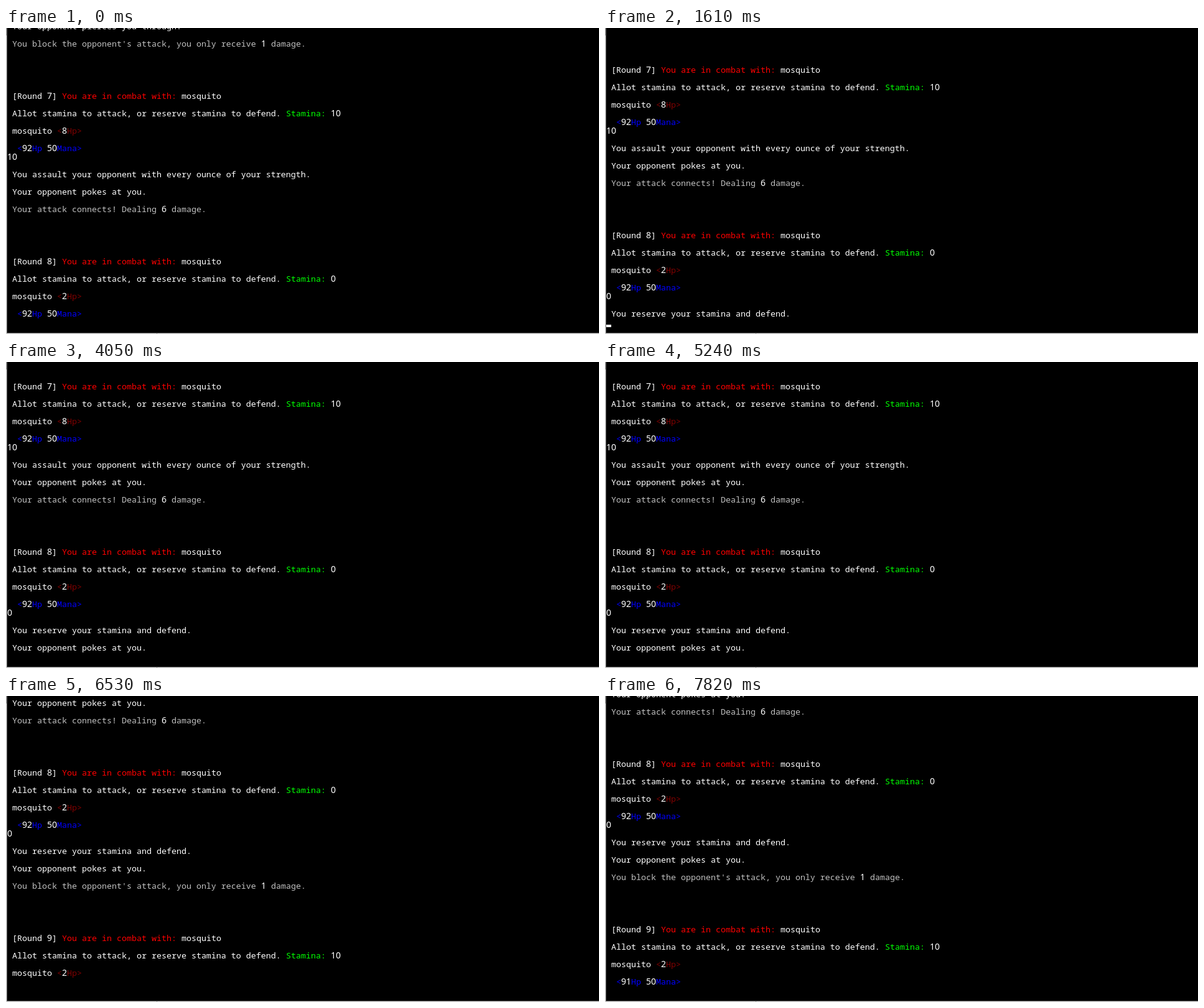
An HTML page for the animation above (8 s loop, 953 by 492 pixels).

```html
<!DOCTYPE html>
<html lang="en">
<head>
<meta charset="utf-8">
<title>Text combat</title>
<style>
html, body { margin: 0; width: 100%; height: 100%; overflow: hidden; background: #000; }
svg { display: block; width: 953px; height: 492px; }
text { font: 13.333px "Noto Sans Mono", "DejaVu Sans Mono", monospace; white-space: pre; }
.num { font: 14px "Noto Sans", "Open Sans", sans-serif; fill: #fff; }
.w { fill: #fff; }
.s { fill: #c0c0c0; }
.r { fill: #f00; }
.m { fill: #800000; }
.g { fill: #0f0; }
.b { fill: #00f; }

#log, #cursor, #typed, #prompt { animation: 8s step-end infinite; }
#log { animation-name: scroll; }
#cursor { animation-name: blink; }
#typed { animation-name: type; }
#prompt { animation-name: ask; }

@keyframes scroll {
  0% { transform: translateY(0); }
  19.375% { transform: translateY(-14px); }
  20.125% { transform: translateY(-42px); }
  50.625% { transform: translateY(-70px); }
  81.625% { transform: translateY(-252px); }
  82.375%, 100% { transform: translateY(-266px); }
}
@keyframes blink {
  0%, 12.5%, 32.625%, 45.625%, 65.5%, 78.625%, 97.75%, 100% { opacity: 0; transform: none; }
  6.25%, 19.375%, 38.75%, 58.5%, 71.625%, 91.625% { opacity: 1; transform: none; }
  16% { opacity: 1; transform: translateX(8px); }
}
@keyframes type {
  0% { opacity: 0; }
  16%, 100% { opacity: 1; }
}
@keyframes ask {
  0% { opacity: 0; }
  82.375%, 100% { opacity: 1; }
}
</style>
</head>
<body>
<svg viewBox="0 0 953 492">
  <defs><clipPath id="view"><rect x="2" width="951" height="481"/></clipPath></defs>
  <rect width="953" height="492"/>
  <g clip-path="url(#view)"><g id="log"></g></g>
  <rect id="cursor" x="2" y="477" width="8" height="4" fill="#fff"/>
  <g shape-rendering="crispEdges">
    <rect width="1" height="492" fill="#e3e3e3"/>
    <rect width="1" height="12" fill="#a0a0a0"/>
    <rect x="1" width="1" height="491" fill="#696969"/>
    <rect x="1" y="490" width="952" height="1" fill="#696969"/>
    <rect y="491" width="953" height="1" fill="#e3e3e3"/>
    <rect x="242" y="491" width="1" height="1" fill="#a0a0a0"/>
  </g>
</svg>
<script>
const NS = "http://www.w3.org/2000/svg";
const CELL = 8, ROW = 14, LEFT = 2, BASE = 2;
const log = document.getElementById("log");

function add(parent, tag, attrs) {
  const el = document.createElementNS(NS, tag);
  for (const key in attrs) el.setAttribute(key, attrs[key]);
  return parent.appendChild(el);
}

// "{r}" switches the colour class; digits are always white
function print(row, line, id) {
  const text = add(log, "text", { y: BASE + row * ROW });
  if (id) text.id = id;
  let col = 0, tone = "w";
  for (const part of line.match(/\{\w\}|\d+|[^\d{]+/g)) {
    if (part[0] === "{") { tone = part[1]; continue; }
    const span = add(text, "tspan", {
      x: LEFT + col * CELL,
      class: /\d/.test(part) ? "num" : tone
    });
    span.textContent = part;
    col += part.length;
  }
}

function round(row, n, stamina, foeHp, hp, id) {
  print(row, ` [Round ${n}] {r}You are in combat with: {w}mosquito`);
  print(row + 2, ` Allot stamina to attack, or reserve stamina to defend. {g}Stamina: ${stamina}`);
  print(row + 4, ` mosquito {m}<${foeHp}Hp>`);
  print(row + 6, `  {b}<${hp}Hp 50Mana>`, id);
}

const poke = " Your opponent pokes at you.";
const block = "{s} You block the opponent's attack, you only receive 1 damage.";

print(0, " Your opponent pierces you through.");
print(2, block);
round(8, 7, 10, 8, 92);
print(15, "10");
print(17, " You assault your opponent with every ounce of your strength.");
print(19, poke);
print(21, "{s} Your attack connects! Dealing 6 damage.");
round(27, 8, 0, 2, 92);
print(34, "0", "typed");
print(36, " You reserve your stamina and defend.");
print(38, poke);
print(40, block);
round(46, 9, 10, 2, 91, "prompt");
</script>
</body>
</html>
```
